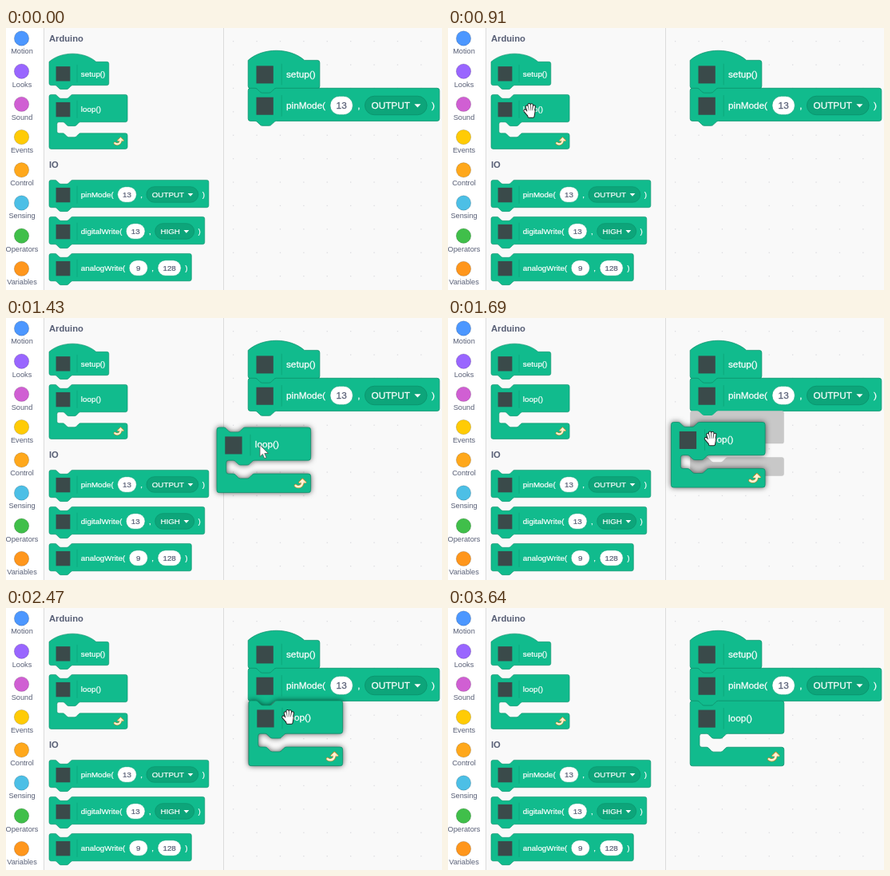
Write an HTML page with a canvas that moves like this. It is 546x328 px and loops after 3.9 s.

```html
<!DOCTYPE html>
<html lang="en">
<head>
<meta charset="utf-8">
<title>Block editor</title>
<style>
  html, body { margin: 0; width: 100%; height: 100%; overflow: hidden; background: #f9f9f9; }
  canvas { display: block; width: 546px; height: 328px; }
</style>
</head>
<body>
<canvas id="stage"></canvas>
<script>
const W = 546, H = 328, LOOP = 3900, STEP = 130;
const FONT = '"Liberation Sans", Arial, sans-serif';
const SMALL = 0.613, LARGE = 0.735;
const GREEN = '#11bb8d', GREEN_DARK = '#0b8e69', GREEN_MID = '#0da57a';
const INK = '#575e75', LOGO = '#3a4a4a';

const dpr = window.devicePixelRatio || 1;
const canvas = document.getElementById('stage');
canvas.width = W * dpr;
canvas.height = H * dpr;
const ctx = canvas.getContext('2d');

// Block outlines, in block units
const NOTCH = 'c2,0 3,1 4,2l4,4c1,1 2,2 4,2h12c2,0 3,-1 4,-2l4,-4c1,-1 2,-2 4,-2';
const TAB = 'c-2,0 -3,1 -4,2l-4,4c-1,1 -2,2 -4,2h-12c-2,0 -3,-1 -4,-2l-4,-4c-1,-1 -2,-2 -4,-2';
const TOP = w => `M0,4a4,4 0 0 1 4,-4H12${NOTCH}H${w - 4}a4,4 0 0 1 4,4`;
const hatPath = w => new Path2D(
  `M0,0c25,-22 71,-22 96,0H${w - 4}a4,4 0 0 1 4,4V44a4,4 0 0 1 -4,4H48${TAB}H4a4,4 0 0 1 -4,-4Z`);
const stackPath = w => new Path2D(
  `${TOP(w)}V52a4,4 0 0 1 -4,4H48${TAB}H4a4,4 0 0 1 -4,-4Z`);
const cPath = new Path2D(
  `${TOP(160)}V52a4,4 0 0 1 -4,4H64${TAB}H20a4,4 0 0 0 -4,4V75a4,4 0 0 0 4,4` +
  `H28${NOTCH}H156a4,4 0 0 1 4,4V107a4,4 0 0 1 -4,4H4a4,4 0 0 1 -4,-4Z`);

function text(str, x, y, size, color, align = 'left', weight = '') {
  ctx.font = `${weight} ${size}px ${FONT}`;
  ctx.fillStyle = color;
  ctx.textAlign = align;
  ctx.fillText(str, x, y);
}

// Block text is a little heavier than regular
function label(str, x, y, color = '#fff', align = 'left') {
  text(str, x, y, 16, color, align);
  ctx.lineWidth = 0.35;
  ctx.strokeStyle = color;
  ctx.strokeText(str, x, y);
}

function textWidth(str) {
  ctx.font = `16px ${FONT}`;
  return ctx.measureText(str).width;
}

function pill(x, cy, w, fill, stroke) {
  ctx.beginPath();
  ctx.roundRect(x, cy - 16, w, 32, 16);
  ctx.fillStyle = fill;
  ctx.fill();
  ctx.lineWidth = 1;
  ctx.strokeStyle = stroke;
  ctx.stroke();
}

function at(x, y, scale, draw) {
  ctx.save();
  ctx.translate(x, y);
  ctx.scale(scale, scale);
  draw();
  ctx.restore();
}

function shape(path, shadow) {
  ctx.save();
  if (shadow) {
    ctx.shadowColor = 'rgba(0,0,0,.7)';
    ctx.shadowBlur = 7.5 * dpr;
  }
  ctx.fillStyle = GREEN;
  ctx.fill(path);
  ctx.restore();
  ctx.lineWidth = 1;
  ctx.strokeStyle = GREEN_DARK;
  ctx.stroke(path);
}

function badge(cy) {
  ctx.fillStyle = LOGO;
  ctx.fillRect(14, cy - 14.5, 29, 30);
  ctx.fillStyle = 'rgba(11,142,105,.5)';
  ctx.fillRect(56.5, cy - 18, 1.2, 36);
}

function repeatIcon() {
  const outline = (color, width) => {
    ctx.strokeStyle = ctx.fillStyle = color;
    ctx.lineWidth = width;
    ctx.lineCap = ctx.lineJoin = 'round';
    ctx.beginPath();
    ctx.arc(139, 94, 7, 0, 2.3);
    ctx.stroke();
    ctx.lineWidth = width - 2.5;
    ctx.beginPath();
    ctx.moveTo(140.5, 93.5);
    ctx.lineTo(146, 88);
    ctx.lineTo(151.5, 93.5);
    ctx.closePath();
    ctx.fill();
    ctx.stroke();
  };
  outline('#c08a2c', 5.6);
  outline('#fff3d6', 3.6);
}

function setupBlock(x, y, k) {
  at(x, y, k, () => {
    shape(hatPath(122));
    badge(24);
    label('setup()', 65, 30);
  });
}

function loopBlock(x, y, k, shadow) {
  at(x, y, k, () => {
    shape(cPath, shadow);
    badge(30);
    label('loop()', 65, 34.5);
    repeatIcon();
  });
}

function callBlock(x, y, k, name, first, second, menu) {
  const mid = 29.5, base = 35;
  const valueWidth = v => Math.max(38, textWidth(v) + 21);
  const start = 65 + textWidth(name) + 8;
  const comma = start + valueWidth(first) + 8;
  const next = comma + textWidth(',') + 8;
  const nextWidth = menu ? textWidth(second) + 40 : valueWidth(second);
  const close = next + nextWidth + 8;
  at(x, y, k, () => {
    shape(stackPath(close + textWidth(')') + 8));
    badge(30);
    label(name, 65, base);
    value(first, start);
    label(',', comma, base);
    if (menu) {
      pill(next, mid, nextWidth, GREEN_MID, GREEN_DARK);
      label(second, next + 11, base);
      const a = next + nextWidth - 16;
      ctx.beginPath();
      ctx.moveTo(a - 5.5, mid - 2.5);
      ctx.lineTo(a + 5.5, mid - 2.5);
      ctx.lineTo(a, mid + 3.5);
      ctx.fill();
    } else value(second, next);
    label(')', close, base);
  });
  function value(v, vx) {
    const w = valueWidth(v);
    pill(vx, mid, w, '#fff', GREEN_MID);
    label(v, vx + w / 2, base, INK, 'center');
  }
}

const CATEGORIES = [
  ['Motion', '#4c97ff'], ['Looks', '#9966ff'], ['Sound', '#d05fd3'], ['Events', '#ffcb05'],
  ['Control', '#ffa81c'], ['Sensing', '#4cbfe6'], ['Operators', '#40bf4a'], ['Variables', '#ff961c']
];

function background() {
  ctx.fillStyle = '#f9f9f9';
  ctx.fillRect(0, 0, W, H);
  ctx.fillStyle = '#dcdce0';
  for (let x = 284; x < W; x += 29.4)
    for (let y = 16; y < H; y += 29.4) ctx.fillRect(x, y, 1.3, 1.3);
  ctx.fillStyle = '#fff';
  ctx.fillRect(0, 0, 47, H);
  ctx.fillStyle = '#dcdcdc';
  ctx.fillRect(47, 0, 1, H);
  ctx.fillRect(272, 0, 1, H);
  CATEGORIES.forEach(([name, color], i) => {
    const y = 13 + i * 41.2;
    ctx.beginPath();
    ctx.arc(19.5, y, 9.2, 0, 7);
    ctx.fillStyle = color;
    ctx.fill();
    ctx.lineWidth = 0.8;
    ctx.strokeStyle = 'rgba(0,0,0,.2)';
    ctx.stroke();
    text(name, 20, y + 19.4, 9.2, INK, 'center');
  });
}

function palette() {
  text('Arduino', 54, 16.5, 11.2, INK, 'left', 'bold');
  text('IO', 54, 174.5, 11.2, INK, 'left', 'bold');
  setupBlock(54, 42.3, SMALL);
  loopBlock(54, 83.4, SMALL);
  callBlock(54, 190.4, SMALL, 'pinMode(', '13', 'OUTPUT', true);
  callBlock(54, 236.4, SMALL, 'digitalWrite(', '13', 'HIGH', true);
  callBlock(54, 282.4, SMALL, 'analogWrite(', '9', '128', false);
}

function hand(x, y) {
  const fingers = [[-4.2, -4.5, -2.2, 2], [-1.4, -6.8, -0.6, 2], [1.8, -6.6, 1.3, 2],
    [4.8, -4.6, 3.4, 3], [-6.6, 0.6, -2.8, 5]];
  const layer = (color, grow) => {
    ctx.strokeStyle = ctx.fillStyle = color;
    ctx.lineCap = ctx.lineJoin = 'round';
    ctx.lineWidth = 2.3 + grow;
    ctx.beginPath();
    for (const [x1, y1, x2, y2] of fingers) {
      ctx.moveTo(x1, y1);
      ctx.lineTo(x2, y2);
    }
    ctx.moveTo(-3, 2);
    ctx.lineTo(4.5, 1);
    ctx.lineTo(3.4, 7.6);
    ctx.lineTo(-1.4, 7.6);
    ctx.closePath();
    ctx.fill();
    ctx.stroke();
  };
  at(x, y, 1, () => {
    layer('#222', 2);
    layer('#fff', 0);
    ctx.strokeStyle = '#555';
    ctx.lineWidth = 0.6;
    ctx.beginPath();
    for (const fx of [-2.4, 0.3, 3]) {
      ctx.moveTo(fx, -4);
      ctx.lineTo(fx * 0.8, 0);
    }
    ctx.stroke();
  });
}

const ARROW = new Path2D('M0,0V14.5L3.4,11.4L5.7,16.8L8.1,15.8L5.8,10.5H10.4Z');
function arrow(x, y) {
  at(x, y, 1, () => {
    ctx.fillStyle = '#fff';
    ctx.fill(ARROW);
    ctx.lineWidth = 0.8;
    ctx.strokeStyle = '#555';
    ctx.stroke(ARROW);
  });
}

// Pointer hotspot: time, x, y
const PATH = [
  [390, 168, 296], [650, 112, 122], [910, 107, 105], [1040, 112, 107], [1430, 318, 159],
  [1950, 349, 146], [2470, 358, 138], [2600, 358, 139], [3120, 308.5, 293], [3380, 302, 345]
];
const GRAB = [54, 22];
const DRAG = [1040, 2600], SNAP = [1690, 2600];
const DOCK = [303.2, 116.2];
const within = (t, [a, b]) => t >= a && t < b;
const ease = p => p * p * (3 - 2 * p);

function pointer(t) {
  const i = PATH.findIndex(key => key[0] > t);
  if (i < 1) return null;
  const [t0, x0, y0] = PATH[i - 1], [t1, x1, y1] = PATH[i];
  const p = ease((t - t0) / (t1 - t0));
  return [x0 + (x1 - x0) * p, y0 + (y1 - y0) * p];
}

function draw(t) {
  ctx.setTransform(dpr, 0, 0, dpr, 0, 0);
  background();
  palette();
  setupBlock(DOCK[0], 40.4, LARGE);
  callBlock(DOCK[0], 75.3, LARGE, 'pinMode(', '13', 'OUTPUT', true);

  const spot = pointer(t);
  if (within(t, SNAP)) at(...DOCK, LARGE, () => {
    ctx.fillStyle = '#c8c8c8';
    ctx.fill(cPath);
  });
  if (t >= DRAG[1]) loopBlock(...DOCK, LARGE);
  if (!spot) return;
  const [x, y] = spot;
  if (within(t, DRAG)) loopBlock(x - GRAB[0], y - GRAB[1], LARGE, true);
  const useHand = within(t, [650, 1300]) || within(t, [1690, 2730]);
  if (useHand) hand(x - 4, y - 2);
  else arrow(x, y);
}

const begin = performance.now();
function tick() {
  let step = Math.floor(((performance.now() - begin) % LOOP) / STEP);
  if (step === 6) step = 5; // the pointer rests here
  draw(step * STEP);
  requestAnimationFrame(tick);
}
tick();
</script>
</body>
</html>
```
